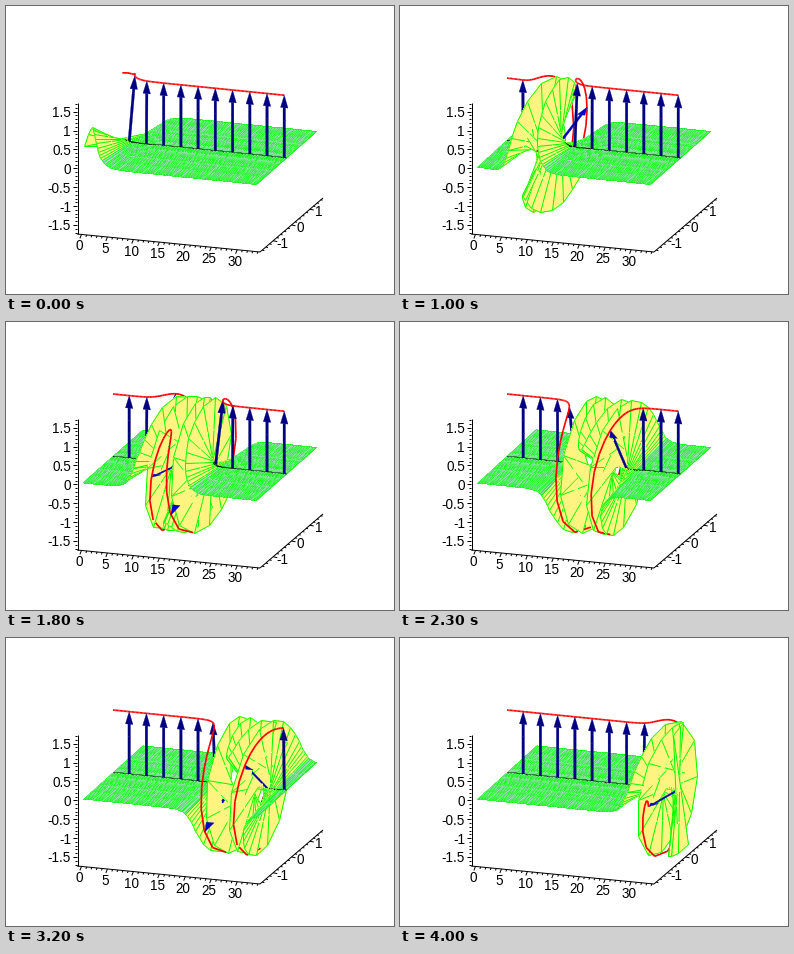
A matplotlib script that plays this animation: 388 by 288 pixels, repeating every 4.1 s.

```python
import numpy as np
import matplotlib.pyplot as plt
from matplotlib.animation import FuncAnimation
from matplotlib.collections import PolyCollection

W, H, DPI = 388, 288, 100
PX = 72 / DPI          # one pixel in points
FRAMES, STEP = 41, 100

GREEN = (0, 1, 0)
YELLOW = (1, 0.955, 0.5)
PALE = (0.70, 0.85, 0.82)
RED = (1, 0, 0)
BLACK = (0, 0, 0)
NAVY = (0, 0, 0.5)

# Moving sine-Gordon breather
FREQ, SPEED = 0.157, 0.2
GAMMA = 1 / np.sqrt(1 - SPEED ** 2)
ROOT = np.sqrt(1 - FREQ ** 2)
AMP = ROOT / FREQ
DECAY = ROOT * GAMMA
WAVE = FREQ * GAMMA * SPEED
BEAT = 0.6165          # phase gain per frame at the centre
DRIFT = 0.82           # travel of the centre per frame

RIBBON_X = np.linspace(0, 33.5, 111)
STRIPS = 4
CURVE_X = np.linspace(0, 33, 130)
ARROW_X = 33 - 3.32 * np.arange(9, -1, -1)


def angle(x, n):
    s = x + 0.25 - DRIFT * n
    phase = BEAT * n - 0.005 - WAVE * s
    return -4 * np.arctan(AMP * np.sin(phase) / np.cosh(DECAY * s))


def project(x, a, c):
    """Screen position; a and c are depth and height in ribbon half widths."""
    x, a, c = np.broadcast_arrays(x, a, c)
    return np.stack([107 + 5.19 * x + 30 * a,
                     134.5 + 0.522 * x - 26.5 * a - 62.5 * c], axis=-1)


def nearness(x, a, c):
    return 1.668 * x - 85.1 * a + 19.5 * c


def hairline(p, q):
    """Stroke width that covers one pixel per step along the long side."""
    d = np.abs(q - p)
    return max(d.max() / (np.hypot(*d) + 1e-9), 0.75)


def spokes(n):
    """Ribs and cell diagonals in turn, each cut into strips."""
    u = angle(RIBBON_X, n)
    near_x, far_x = np.repeat(RIBBON_X, 2)[:-1], np.repeat(RIBBON_X, 2)[1:]
    near_u, far_u = np.repeat(u, 2)[:-1], np.repeat(u, 2)[1:]
    near = near_x, -np.cos(near_u), np.sin(near_u)
    far = far_x, np.cos(far_u), -np.sin(far_u)
    w = np.linspace(0, 1, STRIPS + 1)
    depth = np.outer(nearness(*near), 1 - w) + np.outer(nearness(*far), w)
    p, q = (np.floor(project(*end)) + 0.5 for end in (near, far))
    pts = p[:, None] + w[:, None] * (q - p)[:, None]
    return near_u, pts, depth


def ribbon(n):
    u, pts, near = spokes(n)
    mean = (near[1:, 1:] + near[1:, :-1] + near[:-1, 1:] + near[:-1, :-1]) / 4
    rows, cols = mean.shape
    mid = cols // 2
    padded = np.pad(mean, ((1, 1), (0, 0)), mode="edge")
    top = np.maximum(padded[1:], padded[:-1])
    twist = np.abs(np.diff(np.append(u, u[-1])))
    for i in range(rows):
        flat = twist[max(i - 1, 0):i + 1].max() < 0.03 and np.cos(u[i]) > 0.98
        for j in range(cols):
            quad = pts[i, j], pts[i + 1, j], pts[i + 1, j + 1], pts[i, j + 1]
            yield mean[i, j], quad, PALE if flat else YELLOW, "none", 0, False
        for j, side in ((0, 0), (cols, cols - 1)):
            p, q = pts[i, j], pts[i + 1, j]
            if np.any(p != q):
                yield mean[i, side], (p, q), "none", GREEN, hairline(p, q), True
        if abs(u[i]) < 0.6:
            d = mean[i, mid - 1:mid + 1].max() + 0.5
            yield d, (pts[i, mid], pts[i + 1, mid]), "none", BLACK, 1, True
    for spoke, depth in zip(pts, top):
        width = hairline(spoke[0], spoke[-1])
        for j in range(cols):
            yield depth[j], spoke[j:j + 2], "none", GREEN, width, True


def curve(n):
    u = angle(CURVE_X, n)
    a, c = np.sin(u), np.cos(u)
    pts, near = project(CURVE_X, a, c), nearness(CURVE_X, a, c)
    for i in range(len(u) - 1):
        yield near[i:i + 2].mean(), pts[i:i + 2], "none", RED, 1.7, True


def arrows(n):
    cuts = np.linspace(0, 0.8, 5)
    pieces = [(lo, hi, 0.24, 0.24) for lo, hi in zip(cuts[:-1], cuts[1:])]
    pieces.append((0.8, 1.0, 0.72, 0.0))
    for x, u in zip(ARROW_X, angle(ARROW_X, n)):
        a, c = np.sin(u), np.cos(u)
        face = (0, 0, 0.5 + 0.35 * a * a)
        for lo, hi, w0, w1 in pieces:
            r = np.array([lo, lo, hi, hi])
            xs = x + np.array([-w0, w0, w1, -w1])
            mid = (lo + hi) / 2
            yield (nearness(x, mid * a, mid * c),
                   project(xs, r * a, r * c), face, NAVY, 0.3, True)


fig = plt.figure(figsize=(W / 100, H / 100), dpi=DPI, facecolor="white")
ax = fig.add_axes([0, 0, 1, 1])
ax.set_xlim(0, W)
ax.set_ylim(H, 0)
ax.axis("off")


def rule(p, q):
    ax.plot([p[0], q[0]], [p[1], q[1]], color="black", lw=PX,
            solid_capstyle="butt")


def label(x, y, text, ha="center"):
    ax.text(x, y, text, ha=ha, va="center_baseline", color="black",
            family="Liberation Sans", fontsize=13.5 * PX)


def draw_axes():
    rule((71.5, 97), (71.5, 228))
    rule((71, 228), (254, 246))
    rule((254, 246), (317, 192))
    for k in range(-17, 18):
        y = 162.3 - 3.78 * k
        rule((71, y), (67 if k % 5 == 0 else 69, y))
        if k % 5 == 0:
            label(65, y, f"{k / 10:g}", "right")
    for k in range(0, 35):
        x, y = 75.5 + 5.19 * k, 228.4 + 0.511 * k
        size = 4 if k % 5 == 0 else 2
        rule((x, y), (x - size * 0.4, y + size))
        if k % 5 == 0 and k <= 30:
            label(x - 2, y + 10.5, str(k))
    for k in range(-8, 9):
        x, y = 285.5 + 3.64 * k, 219 - 3.16 * k
        size = 4 if k % 5 == 0 else 2
        rule((x, y), (x + size, y + size * 0.2))
        if k % 5 == 0:
            label(x + 9, y + 1.5, str(k // 5))


draw_axes()
scene = PolyCollection([], joinstyle="round", zorder=3)
scene.set_snap(False)
ax.add_collection(scene, autolim=False)


def update(n):
    parts = [*ribbon(n), *curve(n), *arrows(n)]
    parts.sort(key=lambda part: part[0])
    _, shapes, faces, edges, widths, smooth = zip(*parts)
    scene.set_verts(shapes)
    scene.set_facecolor(faces)
    scene.set_edgecolor(edges)
    scene.set_linewidth([w * PX for w in widths])
    scene.set_antialiased(list(smooth))
    return [scene]


anim = FuncAnimation(fig, update, frames=FRAMES, interval=STEP,
                     repeat=True, repeat_delay=0, blit=False)
plt.show()
```
